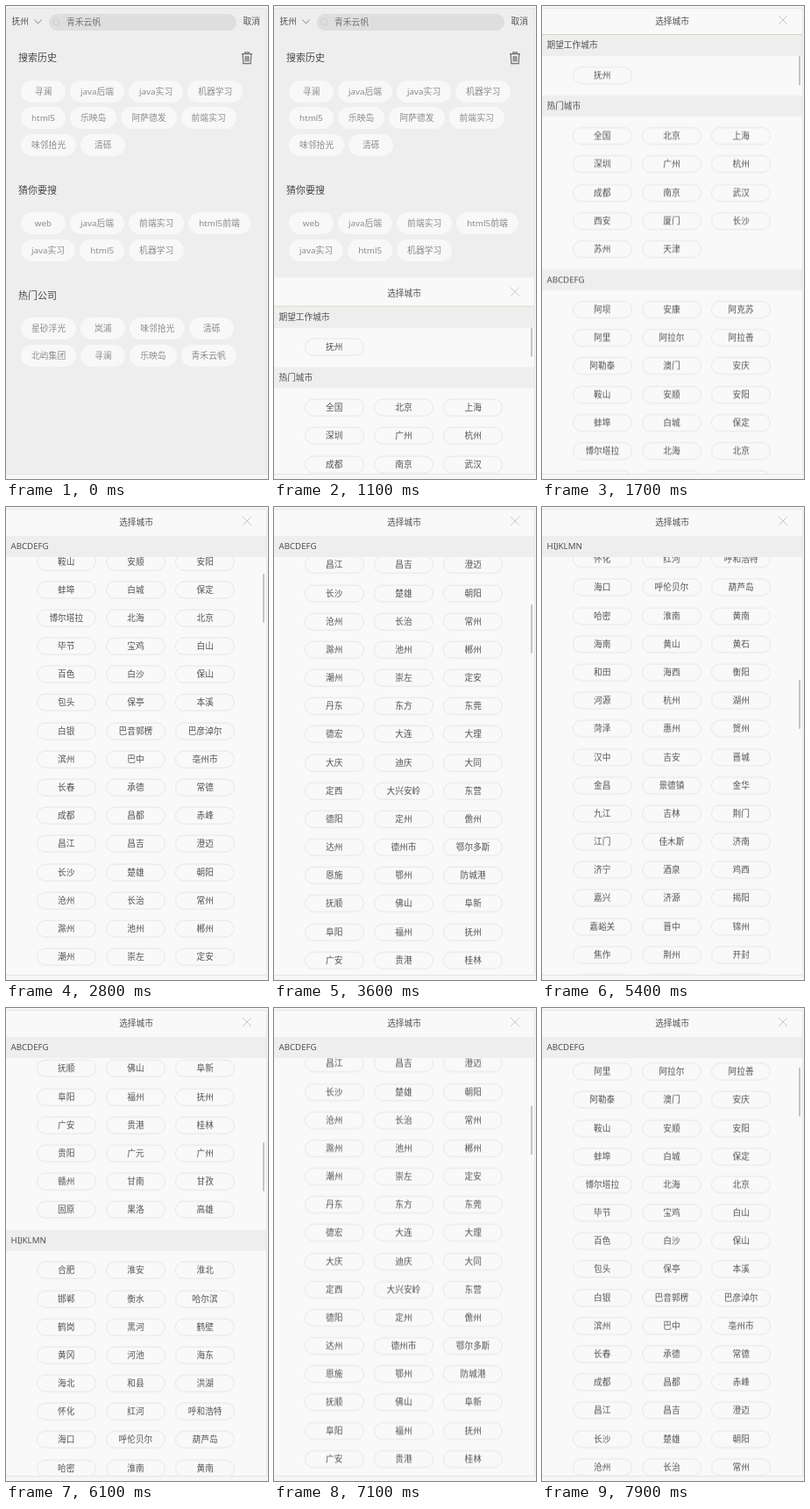
These frames come from a looping animation (299x539 px, 8 s). An HTML page:

```html
<!DOCTYPE html>
<html lang="zh-CN">
<head>
<meta charset="utf-8">
<title>选择城市</title>
<style>
  html, body { margin: 0; width: 100%; height: 100%; overflow: hidden; background: #f5f5f5; }
  body { font: 9.7px/20px "Noto Sans", "Noto Sans CJK SC", "Noto Sans CJK", sans-serif; color: #505050; }
  #stage { position: relative; width: 299px; height: 539px; overflow: hidden; background: #f6f6f6; }
  #stage::after { content: ""; position: absolute; left: 0; top: 2px; width: 297px; height: 530px;
    border: solid #e6e6e6; border-width: 1px 1px 1px 0; }
  #screen { position: absolute; left: 0; top: 2px; width: 297px; height: 531px; overflow: hidden; background: #eee; }
  #search, #city { position: absolute; left: 0; top: -2px; width: 297px; height: 535px; }
  #search > *, #city > *, #list > * { position: absolute; white-space: nowrap; }
  svg { fill: none; overflow: visible; }

  .field { left: 49px; top: 9px; width: 194px; height: 19px; padding-left: 20px; border-radius: 10px;
    background: #dedede; color: #777; font-size: 9.8px; line-height: 19px; }
  h2 { margin: 0; left: 14px; font-size: 11px; line-height: 20px; font-weight: 400; color: #484848; }
  .tags { left: 17px; width: 268px; display: flex; flex-wrap: wrap; gap: 5.6px 5px; font-size: 9.8px; }
  .tags span { box-sizing: border-box; min-width: 51px; height: 25px; padding: 0 12px; border-radius: 13px;
    background: #f8f8f8; color: #8c8c8c; text-align: center; line-height: 25px; }

  #city { background: #f9f9f9; overflow: hidden; }
  #list { left: 0; top: 0; width: 297px; will-change: transform; }
  .head { left: 0; top: 0; width: 297px; height: 33px; line-height: 35px; text-align: center; background: #f9f9f9; }
  .bar { left: 0; width: 291.5px; height: 24px; padding-left: 5.5px; line-height: 24px; background: #eee; }
  #rule { left: 0; top: 32px; width: 297px; height: 1px; background: #ccd9c4; }
  .pill { box-sizing: border-box; width: 67.5px; height: 20px; border: 1px solid #e6e6e6; border-radius: 10px;
    text-align: center; line-height: 18px; }
  #thumb { left: 292.5px; top: 0; width: 2.5px; height: 56px; border-radius: 2px; background: #c4c4c4; }
</style>
</head>
<body>
<div id="stage">
  <div id="screen">
    <div id="search">
      <span style="left:6.5px;top:8px">抚州</span>
      <svg style="left:32px;top:15px" width="9" height="6" stroke="#888"><path d="M.5 .5 4.5 5 8.5 .5"/></svg>
      <div class="field">青禾云帆</div>
      <svg style="left:53px;top:14px" width="10" height="10" stroke="#cdcdcd"><circle cx="4" cy="4" r="3.5"/><path d="M6.6 6.6 9.5 9.5"/></svg>
      <span style="left:270.5px;top:8px">取消</span>
      <svg style="left:269px;top:52px" width="12" height="14" stroke="#707070" stroke-width="1.2"><path d="M0 2.6H12M3.8 2.6V.8H8.2V2.6M1.2 2.6 1.8 13.6H10.2L10.8 2.6M4.2 5V11.4M6 5V11.4M7.8 5V11.4"/></svg>
    </div>
    <div id="city">
      <div id="list"></div>
      <div id="thumb"></div>
      <div class="bar" id="fixed" style="top:33px"></div>
      <div class="head">选择城市</div>
      <div id="rule"></div>
      <svg style="left:270px;top:11px" width="10" height="10" stroke="#c8c8c8"><path d="M0 0 10 10M10 0 0 10"/></svg>
    </div>
  </div>
</div>
<script>
const $ = id => document.getElementById(id);

function add(parent, tag, cls, text, style) {
  const el = document.createElement(tag);
  if (cls) el.className = cls;
  el.textContent = text;
  Object.assign(el.style, style);
  parent.append(el);
  return el;
}

// Search page: heading centre and its tags
const groups = [
  ['搜索历史', 59, '寻澜 java后端 java实习 机器学习 html5 乐映岛 阿萨德发 前端实习 味邻拾光 清砾'],
  ['猜你要搜', 209.5, 'web java后端 前端实习 html5前端 java实习 html5 机器学习'],
  ['热门公司', 329.5, '星砂浮光 岚浦 味邻拾光 清砾 北屿集团 寻澜 乐映岛 青禾云帆']
];
for (const [title, y, words] of groups) {
  add($('search'), 'h2', '', title, { top: y - 10 + 'px' });
  const box = add($('search'), 'div', 'tags', '', { top: y + 25.5 + 'px' });
  for (const word of words.split(' ')) add(box, 'span', '', word);
}

// City page: sections of three-column rows
const PITCH = 32.18;
const sections = [
  ['期望工作城市', '抚州'],
  ['热门城市', '全国 北京 上海 深圳 广州 杭州 成都 南京 武汉 西安 厦门 长沙 苏州 天津'],
  ['ABCDEFG', `阿坝 安康 阿克苏 阿里 阿拉尔 阿拉善 阿勒泰 澳门 安庆 鞍山 安顺 安阳 蚌埠 白城 保定
    博尔塔拉 北海 北京 毕节 宝鸡 白山 百色 白沙 保山 包头 保亭 本溪 白银 巴音郭楞 巴彦淖尔
    滨州 巴中 亳州市 长春 承德 常德 成都 昌都 赤峰 昌江 昌吉 澄迈 长沙 楚雄 朝阳
    沧州 长治 常州 滁州 池州 郴州 潮州 崇左 定安 丹东 东方 东莞 德宏 大连 大理
    大庆 迪庆 大同 定西 大兴安岭 东营 德阳 定州 儋州 达州 德州市 鄂尔多斯 恩施 鄂州 防城港
    抚顺 佛山 阜新 阜阳 福州 抚州 广安 贵港 桂林 贵阳 广元 广州 赣州 甘南 甘孜 固原 果洛 高雄`],
  ['HIJKLMN', `合肥 淮安 淮北 邯郸 衡水 哈尔滨 鹤岗 黑河 鹤壁 黄冈 河池 海东 海北 和县 洪湖
    怀化 红河 呼和浩特 海口 呼伦贝尔 葫芦岛 哈密 淮南 黄南 海南 黄山 黄石 和田 海西 衡阳
    河源 杭州 湖州 菏泽 惠州 贺州 汉中 吉安 晋城 金昌 景德镇 金华 九江 吉林 荆门
    江门 佳木斯 济南 济宁 酒泉 鸡西 嘉兴 济源 揭阳 嘉峪关 晋中 锦州 焦作 荆州 开封
    喀什 昆明 克拉玛依 拉萨 兰州 洛阳`]
];
let nextTop = 33;
const marks = sections.map(([title, text]) => {
  const top = nextTop, names = text.split(/\s+/);
  add($('list'), 'div', 'bar', title, { top: top + 'px' });
  names.forEach((name, i) => add($('list'), 'div', 'pill', name, {
    left: 35 + i % 3 * 79.2 + 'px',
    top: top + 36.3 + Math.floor(i / 3) * PITCH + 'px'
  }));
  nextTop = top + 36.8 + Math.ceil(names.length / 3) * PITCH;
  return { title, top };
});

// Scroll moves: start, end, final offset, start softness
const moves = [
  [1900, 2800, 380.4, 1.4], [2900, 3800, 706.8, 1.4], [3800, 4700, 1318, 1.4], [4700, 5200, 1492, 1.2],
  [5300, 5400, 1481.6, 1], [5400, 6200, 1080, 1.2], [6400, 6700, 870, 1.2],
  [6900, 7000, 800, 1], [7000, 7100, 701, 1], [7100, 7800, 307, 1], [7800, 7900, 305.7, 1]
];
const easeOut = u => 1 - (1 - u) ** 3;
const part = (t, a, b) => Math.min(1, Math.max(0, (t - a) / (b - a)));

function offsetAt(t) {
  let s = 0;
  for (const [a, b, end, soft] of moves) s += (end - s) * easeOut(part(t, a, b) ** soft);
  return s;
}

function draw(now) {
  const t = Math.floor(now % 8000 / 100) * 100;
  const s = offsetAt(t);
  const open = easeOut(part(t, 1000, 1600));
  $('city').style.transform = `translateY(${(1 - open) * 535}px)`;
  $('list').style.transform = `translateY(${-s}px)`;
  $('thumb').style.transform = `translateY(${34.2 + s * .1098}px)`;
  $('fixed').textContent = marks.filter(m => m.top - s <= 33).pop().title;
  $('rule').style.opacity = t < 2000 ? 1 : 0;
}

const start = performance.now();
function tick() {
  draw(performance.now() - start);
  requestAnimationFrame(tick);
}
tick();
</script>
</body>
</html>
```
